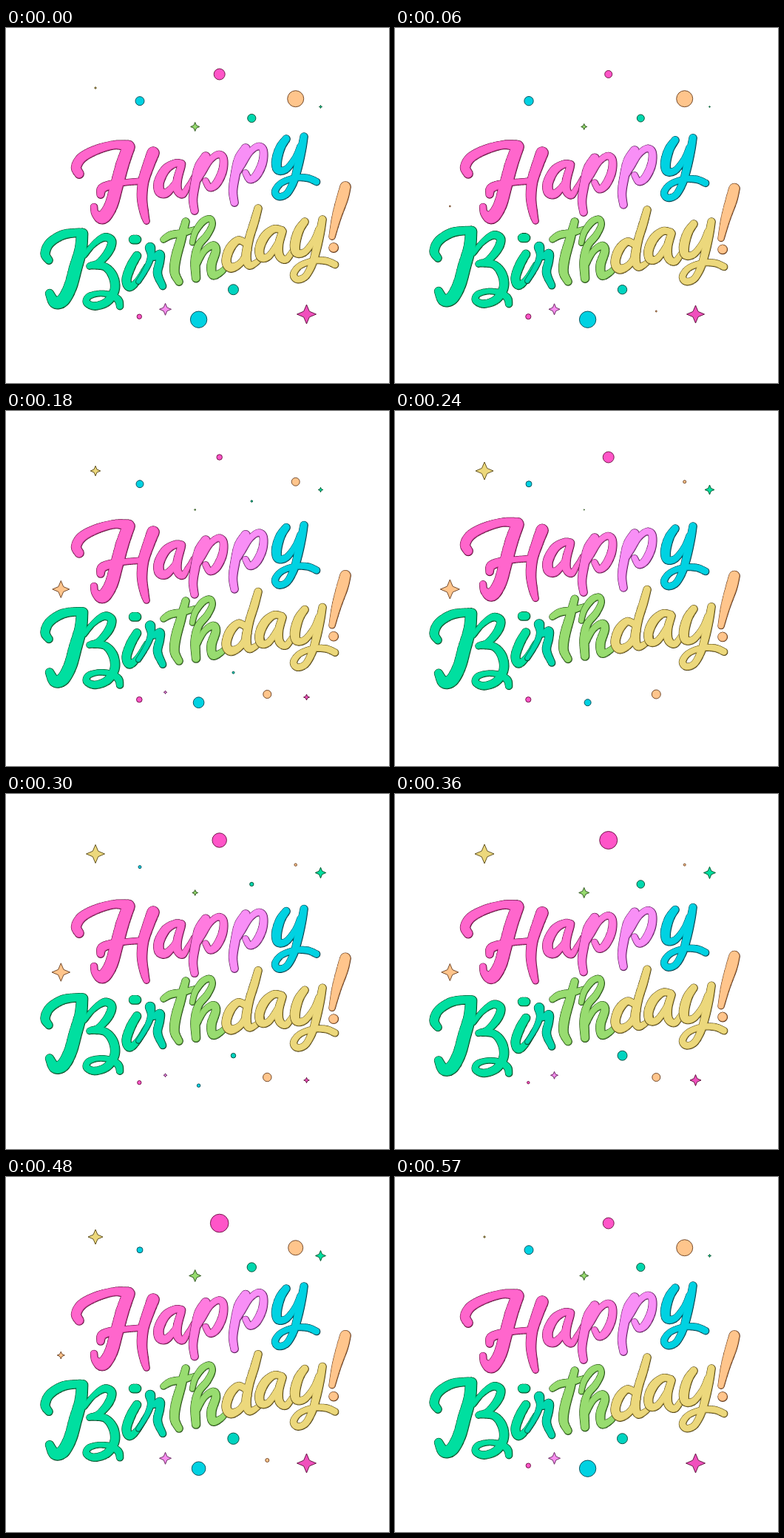
Animation of 518x480 px, one loop 600 ms. Source, as an HTML page with a canvas:

```html
<!DOCTYPE html>
<html lang="en">
<head>
<meta charset="utf-8">
<title>Happy Birthday!</title>
<style>
  html, body { margin: 0; width: 100%; height: 100%; overflow: hidden; background: #fff; }
  canvas { display: block; width: 518px; height: 480px; }
</style>
</head>
<body>
<canvas id="stage" role="img" aria-label="Happy Birthday!"></canvas>
<script>
const W = 518, H = 480, STEP = 30, LOOP = 600, CYCLE = 570, SWING = 4.6;
const canvas = document.getElementById('stage');
const ctx = canvas.getContext('2d');
const ratio = window.devicePixelRatio || 1;
canvas.width = W * ratio;
canvas.height = H * ratio;

const PINK = '#ff66cc', CYAN = '#00d2e2', GREEN = '#00dfa0', TEAL = '#00d8ae',
      LIME = '#98dc70', YELLOW = '#ecd87c', ORANGE = '#ffc58c';

// Darker tones also gain saturation.
function darken(hex, tone) {
  const parts = hex.match(/\w\w/g).map(h =>
    Math.round(255 * tone * (parseInt(h, 16) / 255) ** (3 - 2 * tone)));
  return `rgb(${parts})`;
}

// A brush stroke is a list of "x,y width" knots joined by a smooth curve.
const P_STROKES = [
  '270,174 12/261,188 12/256,210 12/253,231 11/255,247 10',
  '259,208 6/266,196 7/276,179 8/287,171 9/294,176 10/293,193 11/285,210 11/276,216 9/270,207 8'
];
const Y_STROKES = [
  '379,150 10/371,162 12/366,180 13/368,192 11/379,191 9/391,176 8/398,160 8',
  '403,147 10/400,164 11/395,187 11/389,208 10/380,224 9/369,228 9/364,221 9/372,210 8/390,203 8/408,203 9/420,208 9'
];

// low: time in ms at which the letter hangs lowest
const letters = [
  { color: PINK, low: 25, strokes: [
    '99,197 12/95,188 13/103,175 13/124,164 12/148,158 11/166,160 15',
    '166,161 16/158,183 17/150,212 17/142,240 17/131,256 17/121,251 10/119,242 9',
    '128,225 10/130,217 12/142,212 11/160,209 8/184,207 8',
    '199,169 16/193,185 15/186,207 14/184,230 13/187,250 11/190,261 8'] },
  { color: '#ff70d3', low: 60, strokes: [
    '237,184 11/229,183 10/216,191 12/207,208 13/208,221 13/217,223 11/228,211 8/235,196 8',
    '237,187 10/232,205 11/232,219 11/239,225 9/247,213 6/253,202 5'] },
  { color: '#ff7bdf', low: 100, strokes: P_STROKES },
  { color: '#f88ff6', low: 150, shift: [54, -11], strokes: P_STROKES },
  { color: CYAN, low: 258, strokes: Y_STROKES },
  { color: GREEN, low: 450, strokes: [
    '58,314 10/53,305 12/59,291 12/76,280 12/95,277 11/104,278 13',
    '103,279 15/101,300 16/94,325 17/87,350 17/77,368 17/66,371 15/59,359 11',
    '106,308 6/118,293 7/133,283 10/143,288 11/139,302 11/126,317 9/113,322 8',
    '116,321 9/134,323 10/145,336 12/147,354 12/137,370 11/120,376 10/109,371 9/112,363 8/126,359 7/142,361 8/152,368 10/154,376 9'] },
  { color: GREEN, low: 525, strokes: [
    '172,286 11/177,286 11',
    '177,308 11/169,322 12/163,340 12/167,350 11/177,343 8/190,322 6'] },
  { color: TEAL, low: 0, strokes: [
    '179,343 6/190,325 7/196,309 9/195,297 13',
    '195,298 11/199,310 8/208,306 11/208,316 11/205,332 11/212,349 9'] },
  { color: LIME, low: 25, strokes: [
    '243,262 10/237,285 12/230,310 13/228,330 12/234,343 10',
    '213,286 8/223,280 10/240,277 9/256,272 7'] },
  { color: LIME, low: 45, strokes: [
    '252,290 7/256,276 8/266,262 9/276,258 8/279,266 8/272,280 9/260,295 10/256,315 12/257,338 11',
    '258,322 6/268,302 8/280,294 10/284,301 11/278,320 12/280,334 11/291,330 8/300,320 6'] },
  { color: YELLOW, low: 95, strokes: [
    '324,291 9/314,287 10/303,298 12/298,315 12/304,324 12/317,318 9/328,300 8',
    '341,244 10/336,262 11/329,285 11/325,308 12/329,321 10/340,316 7/346,308 6'] },
  { color: YELLOW, low: 140, strokes: [
    '373,273 9/362,272 10/350,282 12/343,298 12/345,310 11/355,309 9/367,292 8/373,278 8',
    '374,275 10/369,293 11/370,308 11/379,313 9/390,298 7'] },
  { color: YELLOW, low: 182, shift: [25, 112], strokes: Y_STROKES },
  { color: ORANGE, low: 232, strokes: [
    '459,215 14/455,230 15/447,256 12/441,282 8',
    '443,297 12/443.2,297 12'] }
];

function spline(a, b, c, d, u) {
  return b + u / 2 * (c - a + u * (2 * a - 5 * b + 4 * c - d + u * (3 * (b - c) + d - a)));
}

function brushDabs(text, [dx, dy]) {
  const knots = text.split('/').map(k => k.split(/[ ,]/).map(Number));
  const knot = i => knots[Math.max(0, Math.min(knots.length - 1, i))];
  const dabs = [];
  for (let i = 0; i < knots.length - 1; i++) {
    const [a, b, c, d] = [-1, 0, 1, 2].map(n => knot(i + n));
    const count = Math.ceil(Math.hypot(c[0] - b[0], c[1] - b[1]) / 1.2);
    for (let n = 0; n <= count; n++) {
      const [x, y, w] = [0, 1, 2].map(k => spline(a[k], b[k], c[k], d[k], n / count));
      dabs.push([x + dx, y + dy, w / 2]);
    }
  }
  return dabs;
}

function dabPath(dabs, grow, offset) {
  const path = new Path2D();
  for (const [x, y, r] of dabs) {
    const radius = Math.max(0.4, r + grow);
    path.moveTo(x + offset + radius, y + offset);
    path.arc(x + offset, y + offset, radius, 0, 2 * Math.PI);
  }
  return path;
}

// Dark edge, shaded rim and bright face: growth, offset, tone
const LAYERS = [[0.8, 0.1, 0.35], [0.1, -0.1, 0.88], [-0.6, -0.3, 1]];

for (const letter of letters) {
  const dabs = letter.strokes.flatMap(s => brushDabs(s, letter.shift || [0, 0]));
  letter.layers = LAYERS.map(([grow, offset, tone]) =>
    ({ path: dabPath(dabs, grow, offset), fill: darken(letter.color, tone) }));
}

// sizes: radius at each of the key times
const KEY_TIMES = [0, 60, 120, 240, 360, 480, CYCLE];
const confetti = [
  { x: 288.7, y: 62.5, color: '#ff55c8', sizes: [7.5, 5, 0, 7.5, 12, 12.3] },
  { x: 121, y: 81, color: YELLOW, star: true, sizes: [1.5, 0, 1.5, 12, 13, 10] },
  { x: 181, y: 98.7, color: CYAN, sizes: [6, 6.2, 6, 4, 0, 4] },
  { x: 391.7, y: 95.7, color: ORANGE, sizes: [11, 11, 9, 2, 1.5, 10] },
  { x: 425.5, y: 106.5, color: GREEN, star: true, sizes: [2, 1, 0, 6.5, 8, 7] },
  { x: 332.3, y: 122, color: TEAL, sizes: [5.6, 5, 2.5, 0, 5.3, 6.2] },
  { x: 255.7, y: 133.5, color: LIME, star: true, sizes: [6, 4, 1.5, 0.7, 7, 8] },
  { x: 74.3, y: 241, color: ORANGE, star: true, sizes: [0, 1.2, 10, 13, 11.5, 5] },
  { x: 307.5, y: 353.7, color: '#00d4c0', sizes: [7, 6.2, 3, 0, 6.5, 7.7] },
  { x: 260.6, y: 394.2, color: CYAN, sizes: [11.2, 11.2, 10.2, 4.5, 0, 9.3] },
  { x: 215.5, y: 380.3, color: '#f88ff0', star: true, sizes: [8, 7.5, 4.5, 0, 5, 8] },
  { x: 180.3, y: 390.2, color: '#ff55c8', sizes: [3.2, 3.6, 4, 3.6, 1.7, 0] },
  { x: 406.5, y: 387, color: '#f050bd', star: true, sizes: [13, 12, 8, 0, 7.5, 13] },
  { x: 353.3, y: 383, color: ORANGE, sizes: [0, 1, 5, 6, 5.5, 2.5] }
];

function sizeAt(sizes, t) {
  const i = Math.min(KEY_TIMES.findLastIndex(k => k <= t), KEY_TIMES.length - 2);
  const u = (t - KEY_TIMES[i]) / (KEY_TIMES[i + 1] - KEY_TIMES[i]);
  return sizes[i] + u * (sizes[(i + 1) % sizes.length] - sizes[i]);
}

function tracePiece({ x, y, star }, r) {
  ctx.beginPath();
  if (!star) {
    ctx.arc(x, y, r, 0, 2 * Math.PI);
    return;
  }
  for (let i = 0; i < 8; i++) {
    const angle = i * Math.PI / 4, reach = i % 2 ? r * 0.42 : r;
    ctx.lineTo(x + reach * Math.cos(angle), y + reach * Math.sin(angle));
  }
  ctx.closePath();
}

function drawPiece(piece, t) {
  const r = sizeAt(piece.sizes, t);
  if (r < 0.3) return;
  tracePiece(piece, r);
  ctx.fillStyle = piece.color;
  ctx.strokeStyle = darken(piece.color, 0.4);
  ctx.lineWidth = 0.9;
  ctx.lineJoin = 'round';
  ctx.fill();
  ctx.stroke();
}

function drawLetter({ layers, low }, t) {
  const wave = time => Math.cos(2 * Math.PI * (time - low) / CYCLE);
  ctx.save();
  ctx.translate(0, SWING * (wave(t) - wave(0)));
  for (const { path, fill } of layers) {
    ctx.fillStyle = fill;
    ctx.fill(path);
  }
  ctx.restore();
}

function draw(t) {
  ctx.setTransform(ratio, 0, 0, ratio, 0, 0);
  ctx.fillStyle = '#fff';
  ctx.fillRect(0, 0, W, H);
  confetti.forEach(piece => drawPiece(piece, t));
  letters.forEach(letter => drawLetter(letter, t));
}

const start = performance.now();
let shown = -1;
function tick() {
  const elapsed = Math.max(0, performance.now() - start) % LOOP;
  const t = Math.floor(elapsed / STEP) * STEP;
  if (t !== shown) draw(shown = t);
  requestAnimationFrame(tick);
}
tick();
</script>
</body>
</html>
```
